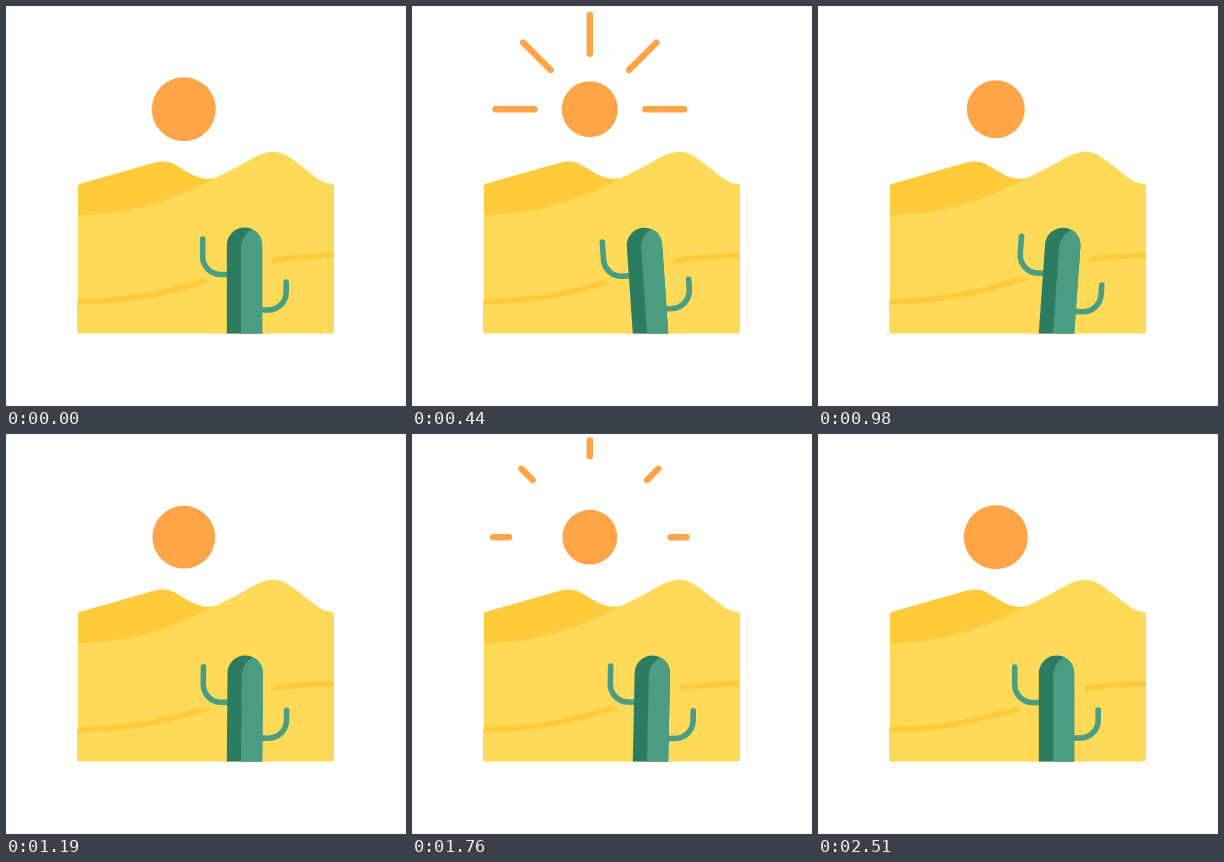
An HTML page that plays this animation: 400 by 400 pixels, repeating every 2660 ms.

```html
<!DOCTYPE html>
<html lang="en">
<head>
<meta charset="utf-8">
<title>Desert sun</title>
<style>
  html, body { margin: 0; width: 100%; height: 100%; overflow: hidden; background: #fff; }
  svg { display: block; width: 100%; height: 100%; }
  .line { fill: none; stroke-linecap: round; stroke-linejoin: round; }
</style>
</head>
<body>
<svg viewBox="0 0 400 400">
  <defs>
    <clipPath id="land">
      <path d="M72 100H328V325.500Q328 327.500 326 327.500H73Q71 327.500 71 325.500V298Q71 296 72 295Z"/>
    </clipPath>
    <path id="arms" d="M196.700 233V250.500A18 18 0 0 0 214.700 268.500H224M280.200 276V286A18 18 0 0 1 262.200 304H253"/>
    <path id="body" d="M220.800 345V239.200A17.700 17.700 0 0 1 256.200 239.200V345Z"/>
  </defs>

  <g id="rays" class="line" stroke="#ffa447" stroke-width="6.400"></g>
  <circle id="sun" cx="177.800" cy="103.200" r="32" fill="#ffa447"/>

  <g clip-path="url(#land)">
    <path fill="#ffcb3a" d="M72 180Q72 178.300 73.500 177.900L146 157.300C155 154.800 162 154.800 170 159.300C182 166 190 172.800 202 172.800C208 172.800 214 171 220 168V215H72Z"/>
    <path fill="#ffda58" d="M71 209.300C120 209.300 165 195 207 173C221 166.500 235 159 246 152.500C263 143.500 273 143.500 286 153C297 160.500 308 171 317 175.800Q321 177.600 326 178Q328 178.300 328 180V328H71Z"/>
    <path class="line" stroke="#ffcb3a" stroke-width="5.600" d="M66 295.600C120 296 160 287 203 273.500C228 265.500 250 257.500 268 254.300C288 251 308 249.600 334 249.500"/>
    <g id="cactus">
      <use href="#arms" class="line" stroke="#ffda58" stroke-width="19.500"/>
      <use href="#body" fill="#ffda58" stroke="#ffda58" stroke-width="20"/>
      <use href="#arms" class="line" stroke="#4a9c82" stroke-width="5.600"/>
      <use href="#body" fill="#2c7c62"/>
      <path fill="#4a9c82" d="M235 345V243C235 234 239 227 246.400 223.300A17.700 17.700 0 0 1 256.200 239.200V345Z"/>
    </g>
  </g>
</svg>
<script>
  const LOOP = 2660, FIRST = 230, STEP = 30, LAST = 2510;
  const START = FIRST - STEP, PULSE = (LAST - START) / 2;
  const SUN = { x: 177.8, y: 103.2, big: 32, small: 27.4 };
  const RAY = { from: 50, to: 96.7 };
  // Damped swing: time in ms, angle in degrees
  const SWING = [[200, 0], [600, -6], [1020, 4.3], [1330, -2.4], [1750, 1.2], [2180, -0.4], [2510, 0]];

  const sun = document.getElementById('sun');
  const cactus = document.getElementById('cactus');
  const raysGroup = document.getElementById('rays');
  const rays = [180, 225, 270, 315, 360].map(deg => {
    const el = document.createElementNS('http://www.w3.org/2000/svg', 'path');
    const a = deg * Math.PI / 180;
    raysGroup.append(el);
    return { el, cos: Math.cos(a), sin: Math.sin(a) };
  });

  const clamp = v => Math.min(1, Math.max(0, v));
  const mix = (a, b, k) => a + (b - a) * k;
  const span = (t, a, b) => clamp((t - a) / (b - a));
  const ease = k => 0.5 - 0.5 * Math.cos(Math.PI * k);
  const easeOut = k => 1 - (1 - k) ** 2;

  function swingAt(t) {
    const i = Math.max(1, SWING.findIndex(([time]) => t <= time));
    const [t0, a0] = SWING[i - 1], [t1, a1] = SWING[i];
    return mix(a0, a1, ease(span(t, t0, t1)));
  }

  function stepTime(t) {
    if (t < FIRST) return START;
    return Math.min(LAST, FIRST + Math.floor((t - FIRST) / STEP) * STEP);
  }

  function draw(now) {
    const t = stepTime(now % LOOP);
    const phase = (t - START) % PULSE;

    const shrink = ease(span(phase, 130, 275)) - easeOut(span(phase, 690, PULSE));
    sun.setAttribute('r', mix(SUN.big, SUN.small, shrink));

    const head = mix(RAY.from, RAY.to, ease(span(phase, 0, 281)));
    const tail = mix(RAY.from, RAY.to, ease(span(phase, 145, 575)));
    raysGroup.style.display = phase > 0 && phase < 720 ? '' : 'none';
    for (const { el, cos, sin } of rays) {
      const at = d => `${(SUN.x + d * cos).toFixed(2)} ${(SUN.y + d * sin).toFixed(2)}`;
      el.setAttribute('d', `M${at(tail)}L${at(Math.max(head, tail + 0.02))}`);
    }

    cactus.setAttribute('transform', `rotate(${swingAt(t)} 238.5 327)`);
  }

  const begin = performance.now();
  function tick() {
    draw(performance.now() - begin);
    requestAnimationFrame(tick);
  }
  tick();
</script>
</body>
</html>
```
